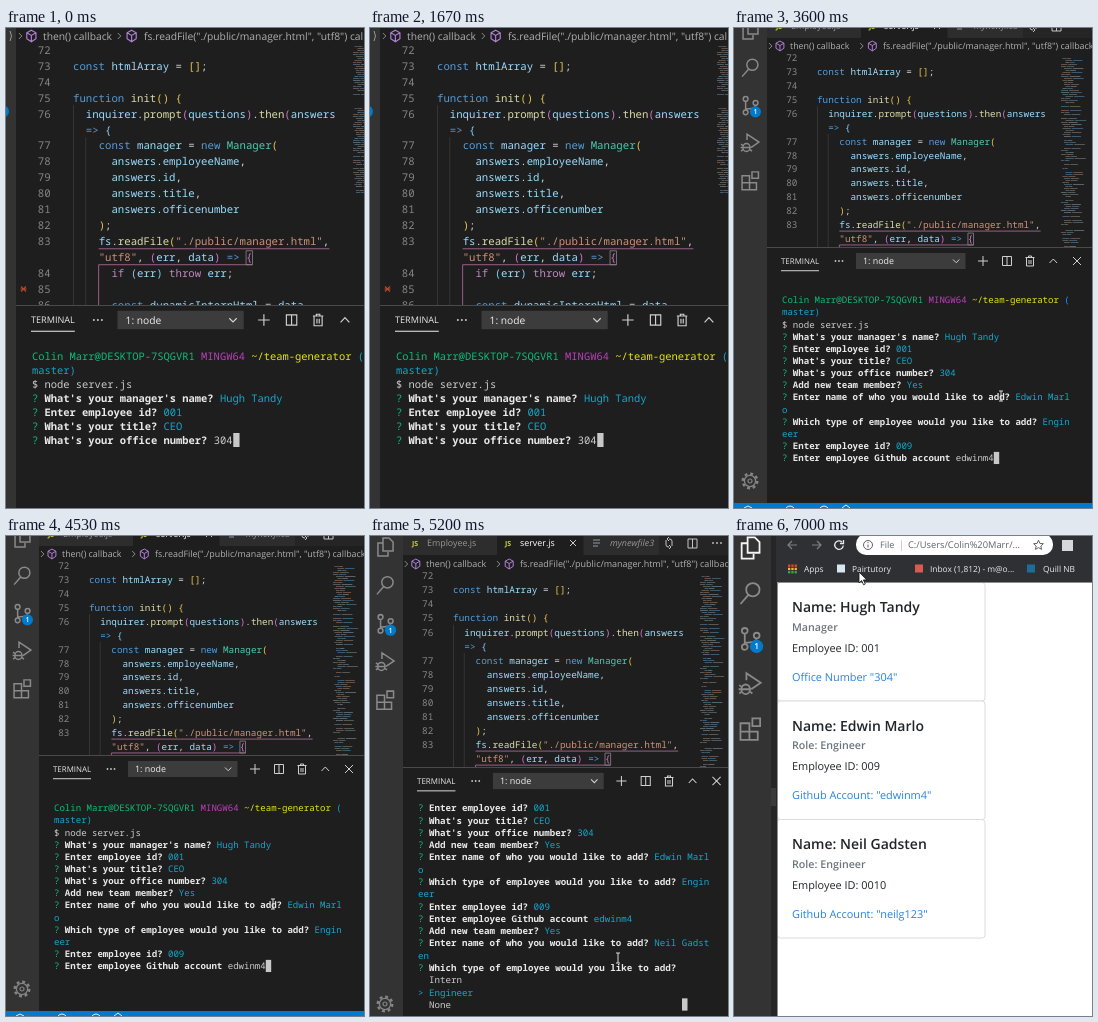
An HTML page for the animation above (9.34 s loop, 358x480 px).

```html
<!DOCTYPE html>
<html lang="en">
<head>
<meta charset="utf-8">
<title>Team generator demo</title>
<style>
html, body { margin: 0; width: 100%; height: 100%; overflow: hidden; background: #1e1e1e; }
svg { display: block; width: 358px; height: 480px; }
text { white-space: pre; text-rendering: geometricPrecision; font-family: "Open Sans", sans-serif; }
.mono { font-family: "Noto Sans Mono", monospace; }
.code { font-weight: 500; }
</style>
</head>
<body>
<svg id="stage" viewBox="0 0 358 480"></svg>
<script>
const LOOP = 9340, STARTS = [0, 2330, 4670, 7000];
const BOSS = 'Hugh Tandy', ENGINEER = 'Edwin Marlo', SECOND = 'Neil Gadsten';

// Drawing helpers; text is placed by its vertical centre.
const rect = (x, y, w, h, fill, more = '') =>
  `<rect x="${x}" y="${y}" width="${w}" height="${h}" fill="${fill}" ${more}/>`;
const text = (x, y, size, fill, s, more = '') =>
  `<text x="${x}" y="${y + size * 0.36}" font-size="${size}" fill="${fill}" ${more}>${s}</text>`;
const line = (d, color, w = 1) =>
  `<path d="${d}" fill="none" stroke="${color}" stroke-width="${w}"/>`;
const disc = (x, y, r, fill) => `<circle cx="${x}" cy="${y}" r="${r}" fill="${fill}"/>`;
const group = (x, y, k, s) => `<g transform="translate(${x} ${y}) scale(${k})">${s}</g>`;
const span = (fill, s, bold) =>
  `<tspan fill="${fill}"${bold ? ' font-weight="700"' : ''}>${s}</tspan>`;
const mono = (x, y, adv, s, kind = '') =>
  text(x, y, adv / 0.6, '#d4d4d4', s, `class="mono ${kind}"`);

// Editor
const CODE = [
  [72, ''], [73, 'const htmlArray = [];'], [74, ''], [75, 'function init() {'],
  [76, '  inquirer.prompt(questions).then(answers'], ['', '  => {'],
  [77, '    const manager = new Manager('], [78, '      answers.employeeName,'],
  [79, '      answers.id,'], [80, '      answers.title,'], [81, '      answers.officenumber'],
  [82, '    );'], [83, '    fs.readFile("./public/manager.html",'],
  ['', '    "utf8", (err, data) => {'], [84, '      if (err) throw err;'], [85, ''],
  [86, '      const dynamicInternHtml = data'],
];
const PAIRS = ['#e8c84a', '#da70d6', '#87cefa'];

// Brackets are coloured by nesting depth, which carries over from line to line.
function highlighter() {
  let depth = 0;
  const bracket = c => span(PAIRS['([{'.includes(c) ? depth++ % 3 : --depth % 3], c);
  const word = (w, call) => span(
    w[0] === '"' ? '#ce9178'
      : /^(const|function|new|=>)$/.test(w) ? '#569cd6'
      : /^(if|throw)$/.test(w) ? '#c586c0'
      : /^[A-Z]/.test(w) ? '#4ec9b0'
      : call ? '#dcdcaa' : '#9cdcfe', w);
  return s => s.replace(/"[^"]*"|=>|\w+|[()[\]{}]/g, (w, at) =>
    /[()[\]{}]/.test(w) ? bracket(w) : word(w, s[at + w.length] === '('));
}

function editor(x, y, adv, pitch) {
  const col = n => x + n * adv, low = n => y + (n + 0.47) * pitch;
  const highlight = highlighter();
  const guides = line(`M${x + 0.5} ${low(3)}V${low(16)}M${col(2)} ${low(5)}V${low(16)}`, '#353535');
  const rows = CODE.map(([n, s], i) => {
    const cy = y + i * pitch;
    return text(col(-5.5), cy, adv / 0.6, '#858585', n, 'class="mono"') +
      mono(x, cy, adv, highlight(s), 'code');
  }).join('');
  const scope = line(`M${col(4)} ${low(12)}H${col(40)}M${col(28)} ${low(13)}H${col(4)}V${low(16)}`, '#985e87') +
    line(`M${col(27)} ${low(12) + 2}H${col(28)}V${low(13)}H${col(27)}Z`, '#8a8a8a', 0.8);
  return guides + rows + scope;
}

function minimap(x, top, bottom, width) {
  let seed = 7, out = '';
  const rnd = () => (seed = seed * 16807 % 2147483647) / 2147483647;
  const colors = ['#425c6d', '#596368', '#675045', '#3b5a72', '#58584f'];
  for (let y = top; y < bottom; y += 2) {
    if (rnd() < 0.12) continue;
    const indent = Math.floor(rnd() * 4) * 1.5, w = (0.2 + rnd() * 0.6) * width;
    out += rect(x + indent, y, w * 0.4, 1, colors[Math.floor(rnd() * 5)]) +
      rect(x + indent + w * 0.45, y, w * 0.55, 1, colors[Math.floor(rnd() * 5)]);
  }
  return out;
}

function crumbs(y, size, x1, x2) {
  const arrow = x => line(`M${x - 1.5} ${y - 3}l3 3l-3 3`, '#8a8a8a');
  const cube = x => group(x, y, size / 9, line('M0 -5L4 -2.8V2.3L0 5L-4 2.3V-2.8ZM-4 -2.8L0 -.5L4 -2.8M0 -.5V5', '#b180d7'));
  return arrow(x1 - 2.2 * size) + cube(x1 - 1.13 * size) + text(x1, y, size, '#b0b0b0', 'then() callback') +
    arrow(x2 - 2.4 * size) + cube(x2 - 1.2 * size) +
    text(x2, y, size, '#b0b0b0', 'fs.readFile("./public/manager.html", "utf8") callback');
}

function tabs(dy) {
  const js = x => text(x, 7, 7, '#cbcb41', 'JS', 'font-weight="700"');
  return group(0, dy, 1,
    rect(33, -10, 325, 29, '#252526') + rect(33, -10, 94, 29, '#2d2d2d') +
    rect(127, -10, 86, 29, '#1e1e1e') + rect(214, -10, 75, 29, '#2d2d2d') +
    js(42) + text(57, 7, 8.9, '#969696', 'Employee.js') +
    js(135) + text(150, 7, 8.9, '#fff', 'server.js') +
    line('M200 4l6 6M206 4l-6 6', '#ccc') +
    line('M223 4h7M223 7h7M223 10h5', '#8a9ba5') +
    text(240, 7, 8.9, '#969696', 'mynewfile3', 'font-style="italic"') +
    rect(289, -10, 69, 29, '#252526') +
    line('M296 4v5q0 2 3 2M302 10v-5q0 -2 -3 -2M299 9l2 2l-2 2M299 1l-2 2l2 2M318 3h9v9h-9zM322.5 3v9', '#c5c5c5') +
    [343, 347, 351].map(x => disc(x, 7, 0.9, '#c5c5c5')).join(''));
}

// Activity bar
const ICONS = [
  'M-2 -9h6l4 4v9h-10zM-2 -4h-5v13h10v-4',
  'M8 -3a5.6 5.6 0 1 1 -11.2 0a5.6 5.6 0 1 1 11.2 0M-1.5 1.5L-8 9',
  'M-2 -6.5a2.4 2.4 0 1 1 -4.8 0a2.4 2.4 0 1 1 4.8 0M-2 7a2.4 2.4 0 1 1 -4.8 0a2.4 2.4 0 1 1 4.8 0M8 -2.5a2.4 2.4 0 1 1 -4.8 0a2.4 2.4 0 1 1 4.8 0M-4.4 -4v8.5M5.6 0q0 3.5 -10 3.5',
  'M-3 -3v-6l12 8l-8 5.5M0 4.5a3.6 4 0 1 1 -7.2 0a3.6 4 0 1 1 7.2 0M-9 1l2 1.5M-9 8l2 -1.5M-9.5 4.5h9M2 8l-2 -1.5',
  'M-8 -5h7.5v7h7v7h-14.5zM-8 2h7.5v7M2 -9h6.5v6.5h-6.5z',
];
const ring = (r, w, more = '') => `<circle r="${r}" fill="none" stroke="#858585" stroke-width="${w}" ${more}/>`;
const GEAR = ring(7.3, 2.4, 'stroke-dasharray="2.9 2.83"') + ring(5.6, 1.3) + ring(2, 1.2);

function activity(width, x, y, step, gearY, first = '#8a8a8a') {
  const k = step / 38;
  return rect(0, 0, width, 480, '#333') +
    ICONS.map((d, i) => group(x, y + i * step, k, line(d, i ? '#8a8a8a' : first, 1.5))).join('') +
    group(x + 5.5 * k, y + 2 * step + 6.5 * k, k, disc(0, 0, 5.6, '#007acc') +
      text(0, 0, 7, '#fff', '1', 'text-anchor="middle" font-weight="600"')) +
    (gearY ? group(x, gearY, 1, GEAR) : '');
}

// Terminal
const INK = { g: '#0dbc79', c: '#11a8cd', m: '#bc3fbc', y: '#e5e510', w: '#e9e9e9', n: '#cccccc' };
const ask = (q, a, ink = 'c') => `g? |w${q} |${ink}${a}`;
const HOST = ['gColin Marr@DESKTOP-7SQGVR1 |mMINGW64 |y~/team-generator |c(', 'cmaster)', 'n$ node server.js',
  ask("What's your manager's name?", BOSS)];
const START = [ask('Enter employee id?', '001'), ask("What's your title?", 'CEO')];
const OFFICE = "What's your office number?", ACCOUNT = 'Enter employee Github account';
const ADD = ask('Add new team member?', 'Yes'), TYPE = 'Which type of employee would you like to add?';
const askName = name => [ask('Enter name of who you would like to add?', name.slice(0, 10)), 'c' + name.slice(10)];
const MEMBER = [...START, ask(OFFICE, '304'), ADD, ...askName(ENGINEER),
  ask(TYPE, 'Engin'), 'ceer', ask('Enter employee id?', '009')];

function terminal(x, y, adv, pitch, rows, cursorCol) {
  const out = rows.map((row, i) => mono(x, y + i * pitch, adv,
    row.split('|').map(s => span(INK[s[0]], s.slice(1), s[0] === 'w')).join(''))).join('');
  return out + rect(x + cursorCol * adv, y + (rows.length - 1) * pitch - pitch / 2, adv, pitch, '#c8c8c8');
}

function panel(left, top, x, y, k) {
  return rect(left, top, 358 - left, 480 - top, '#1e1e1e') + rect(left, top, 358 - left, 1, '#4a4a4a') +
    group(x, y, k,
      text(0, 0, 7.9, '#e7e7e7', 'TERMINAL') + rect(0, 9.3, 38, 0.9, '#e7e7e7') +
      [54.5, 58, 61.5].map(cx => disc(cx, 0, 0.9, '#c5c5c5')).join('') +
      rect(75, -8, 109.5, 16, '#3c3c3c') + text(82, 0, 8.9, '#f0f0f0', '1: node') +
      line('M172 -1.5l3.2 3.2l3.2 -3.2M202 -5v10M197 0h10M221.5 -4.5h9v9h-9zM226 -4.5v9' +
        'M244.5 -3.5h9M247.5 -3.5v-1.5h3v1.5M245.5 -3.5v8.5h7v-8.5M248 -1v4M250 -1v4' +
        'M268.5 2l3.8 -4l3.8 4M292 -4l8 8M300 -4l-8 8', '#d0d0d0'));
}

const ibeam = (x, y) => line(`M${x - 2} ${y - 5}h4M${x} ${y - 5}v10M${x - 2} ${y + 5}h4`, '#d8d8d8');
const base = rect(0, 0, 358, 480, '#1e1e1e');

function officeScene() {
  return base + rect(0, 0, 10, 480, '#333') + disc(-3, 83.5, 6, '#007acc') +
    crumbs(8, 10.3, 37, 138) + line('M4 3q3 5 0 10', '#999') +
    editor(67, 22, 6.41, 15.94) + minimap(347, 16, 68, 24) + minimap(347, 78, 166, 24) +
    line('M15 258.5l5 5M20 258.5l-5 5M14.5 261h6', '#b5452f', 1.2) +
    panel(10, 277, 25, 292, 1.153) +
    terminal(26, 328, 6.27, 14, [...HOST, ...START, ask(OFFICE, '304', 'n')], 32.1);
}

function accountScene() {
  return base + tabs(-9) + crumbs(18, 8.9, 56, 149) + editor(83, 30, 5.59, 13.88) +
    minimap(327, 28, 219, 26) + panel(33, 219, 47, 233, 1) +
    terminal(48, 272, 5.43, 12.15, [...HOST, ...MEMBER, ask(ACCOUNT, 'edwinm4', 'n')], 39) +
    activity(33, 16, 2, 37.7, 453) + ibeam(267, 368) +
    rect(0, 475, 358, 5, '#007acc') +
    line('M10 480l4 -2l4 2M52 480q4 -4 8 0M86 480q4 -4 8 0M108 480l4 -3l4 3', '#e6f2fa');
}

function memberScene() {
  return base + tabs(0) + crumbs(28, 9, 56, 150) + editor(83, 40, 5.63, 14.04) +
    minimap(330, 38, 231, 25) + panel(33, 231, 47, 245, 1.012) +
    terminal(48, 272, 5.5, 12.28, [...MEMBER, ask(ACCOUNT, 'edwinm4'), ADD, ...askName(SECOND),
      ask(TYPE, ''), 'n  Intern', 'c> Engineer', 'n  None'], 48) +
    activity(33, 15, 11, 38.3, 468) + ibeam(248, 422);
}

function card(i, name, role, id, link) {
  const y = 46.5 + i * 118.5;
  return rect(43.5, y, 207.5, 118.5, '#fff', 'rx="3" stroke="#dcdcdc"') +
    text(58, y + 24.5, 14, '#212529', 'Name: ' + name, 'font-weight="600"') +
    text(58, y + 44.5, 10.7, '#6c757d', role, 'font-weight="600"') +
    text(58, y + 65.5, 10.9, '#212529', 'Employee ID: ' + id) +
    text(58, y + 94.5, 10.9, '#2583e0', link);
}

function browserScene() {
  const mark = (x, s, color, tx) => rect(x - 4, 28.5, 8, 8, color) + text(tx, 32.5, 8.4, '#e8eaed', s);
  const dots = ['#ea4335', '#fbbc05', '#34a853'].map((c, r) =>
    [0, 1, 2].map(n => rect(54 + n * 3.3, 28.5 + r * 3.3, 2.3, 2.3, c)).join('')).join('');
  return rect(0, 0, 358, 480, '#fff') + activity(43, 16, 12, 45.3, 0, '#f4f4f4') +
    rect(37, 0, 6, 480, '#262626') + rect(37, 252, 5, 18, '#3a3a3a') +
    rect(42, 0, 316, 46, '#2f3033') + rect(122, -2, 197, 21, '#fff', 'rx="10"') +
    line('M63 9h-9M58 5l-4 4l4 4M78 9h9M83 5l4 4l-4 4', '#7d8084', 1.2) +
    line('M108 6a4.3 4.3 0 1 0 1.3 3.5M109.5 4v3.5h-3.5', '#e8eaed', 1.3) +
    line('M138.5 9a4.5 4.5 0 1 1 -9 0a4.5 4.5 0 1 1 9 0M134 8.5v3M134 6v1.2', '#5f6368') +
    text(146, 9, 9, '#5f6368', 'File') + rect(167, 4, 0.8, 11, '#c4c6c9') +
    text(174, 9, 9.3, '#5f6368', 'C:/Users/Colin%20Marr/...') +
    line('M304.5 4.2l1.4 3.2l3.5 .3l-2.6 2.3l.8 3.4l-3.1 -1.8l-3.1 1.8l.8 -3.4l-2.6 -2.3l3.5 -.3z', '#5f6368') +
    rect(328, 4, 11, 11, '#d5d7da') +
    dots + text(70, 32.5, 8.4, '#e8eaed', 'Apps') +
    mark(107, 'Pairtutory', '#d6e6f2', 118) + mark(185, 'Inbox (1,812) - m@o...', '#d85b50', 196) +
    mark(297, 'Quill NB', '#1c6e98', 309) +
    card(0, BOSS, 'Manager', '001', 'Office Number "304"') +
    card(1, ENGINEER, 'Role: Engineer', '009', 'Github Account: "edwinm4"') +
    card(2, SECOND, 'Role: Engineer', '0010', 'Github Account: "neilg123"') +
    line('M358 46.5H43.5V480', '#8c8c8c') +
    '<path d="M125 36v11l2.6 -2.4l2 4.2l1.7 -.8l-1.9 -4.1h3.4z" fill="#fff" stroke="#111" stroke-width=".8"/>';
}

const stage = document.getElementById('stage');
stage.innerHTML = [officeScene, accountScene, memberScene, browserScene]
  .map(scene => `<g display="none">${scene()}</g>`).join('');
const scenes = [...stage.children];

function draw() {
  const t = performance.now() % LOOP;
  const now = STARTS.filter(s => s <= t).length - 1;
  scenes.forEach((g, i) => g.setAttribute('display', i === now ? 'inline' : 'none'));
  requestAnimationFrame(draw);
}
draw();
</script>
</body>
</html>
```
